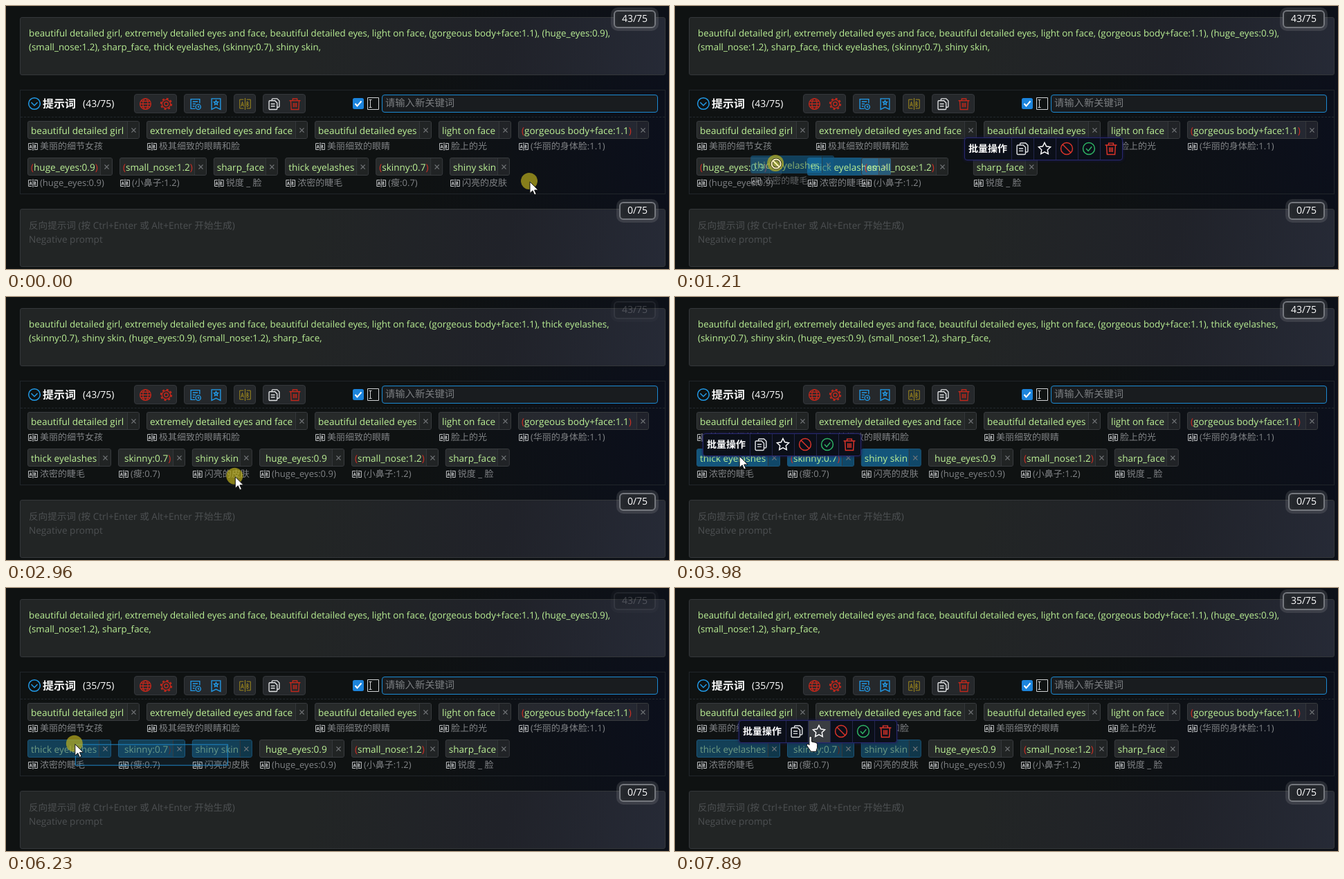
An HTML page that plays this animation: 958x380 px, repeating every 8000 ms.

```html
<!DOCTYPE html>
<html lang="zh">
<head>
<meta charset="utf-8">
<title>Prompt tags</title>
<style>
html, body { margin: 0; width: 100%; height: 100%; overflow: hidden; background: #0f1212; }
#stage { position: relative; width: 958px; height: 380px; overflow: hidden;
  background: radial-gradient(circle at 1000px 190px, #0b0f1d, #0f1212 420px);
  font: 13.55px/20px "Open Sans", "Noto Sans CJK SC", "Noto Sans CJK", sans-serif;
  color: #fff; text-rendering: geometricPrecision; }
#stage div { position: absolute; box-sizing: border-box; white-space: pre; }
svg { position: absolute; overflow: visible; fill: none; stroke: currentColor; stroke-width: 1.3; }
.area { border: 1px solid #34373a; border-radius: 3px; padding: 12px; font-size: 13.35px;
  background: linear-gradient(100deg, #222525 45%, #202229 75%, #262a36); }
.live { color: #b9ee94; }
#stage .hint { color: #4d5052; font-size: 13.6px; padding-top: 13px; }
.panel { border: 1px solid #20252a; }
.rule { border-top: 1px dashed #23292e; }
.box { border: 1px solid #34373b; border-radius: 4px; background: #25282b; }
.badge { border: 2px solid #74777d; border-radius: 6px; background: #23262b; text-align: center;
  line-height: 22px; font-size: 14px; box-shadow: 0 0 0 4px #c0c0c026, inset 0 0 8px #c0c0c013; }
.title { font-size: 16px; font-weight: 700; line-height: 24px; }
.input { border: 1px solid #1c8ad2; border-radius: 4px; background: #191c1f; color: #7c7f82;
  font-size: 14.3px; line-height: 24px; padding-left: 4px; }
.tag { height: 26px; border: 1px solid #383b3e; border-radius: 3px; background: #ffffff1a;
  color: #bdf296; padding-left: 4px; line-height: 26px; }
.tag i { color: #d02f24; font-style: normal; }
.close { right: 0; top: 0; width: 17px; height: 24px; background: #00000026; border-left: 1px solid #34373a; }
.close svg { left: 5px; top: 9px; color: #74777a; }
.picked { background: #1573aab0; border-color: #1b5478; }
.off { color: #6f8a60; }
.off i { color: #5d2822; }
.off.picked { background: #17608599; color: #6e9a83; }
.note { top: 26px; left: 0; height: 20px; font-size: 13px; color: #808386; padding-left: 18px; line-height: 21px; }
.note svg { left: 1px; top: 5px; }
.menu { width: 229px; height: 33px; border: 1px solid #28286f; border-radius: 4px; background: #0b0f19;
  box-shadow: 0 0 4px #191950; font-size: 14px; font-weight: 700; line-height: 32px; padding-left: 5px; }
.cell { top: 0; width: 32px; height: 31px; border-left: 1px solid #23264a; }
.cell svg { left: 6px; top: 6px; }
.rect { border: 1px solid #1f86c4; background: #1f86c414; }
.spot { width: 24px; height: 24px; margin: -13px 0 0 -13px; border-radius: 50%; background: #c6b81ea8; }
</style>
</head>
<body>
<div id="stage"></div>
<script>
const stage = document.getElementById('stage');

function add(cls, x, y, w, h, html = '', parent = stage) {
  const e = document.createElement('div');
  e.className = cls;
  e.style.cssText = `left:${x}px;top:${y}px;` + (w ? `width:${w}px;` : '') + (h ? `height:${h}px;` : '');
  e.innerHTML = html;
  parent.append(e);
  return e;
}
const circle = (x, y, r, more = '') => `<circle cx="${x}" cy="${y}" r="${r}" ${more}/>`;
const path = (d, more = '') => `<path d="${d}" ${more}/>`;
const starPath = (cx, cy, r) => 'M' + Array.from({ length: 10 }, (_, i) => {
  const a = i * Math.PI / 5, q = i % 2 ? r * 0.5 : r;
  return (cx + q * Math.sin(a)).toFixed(2) + ' ' + (cy - q * Math.cos(a)).toFixed(2);
}).join('L') + 'Z';

const shapes = {
  fold: circle(8, 8, 7.4) + path('M4 6.5l4 4 4-4'),
  globe: circle(8, 8, 7.4) + '<ellipse cx="8" cy="8" rx="3.4" ry="7.4"/>' + path('M.6 8h14.8M2 4.2h12M2 11.8h12'),
  gear: circle(8, 8, 2.6) + circle(8, 8, 5.8) + circle(8, 8, 7.2, 'stroke-width="2" stroke-dasharray="2.8 2.85"'),
  list: path('M14 7V1.500H2v13h6M4.500 5h7M4.500 8h4M4.500 11h2.500') + circle(12, 12, 3.4) + path('M12 10.300v2h1.500'),
  mark: path('M2 .8h12v14.700l-6-3-6 3z') + path(starPath(8, 6.4, 3)),
  ab: path('M6 2H.7v12H6M10 2h5.300v12H10M8 0v16M2.500 11.500l1.800-6.500 1.800 6.500M3.200 9.500h2.200M10.300 5v6.500h1.500q1.800-1.600 0-3.200h-1.500 1.300q1.600-1.600 0-3.300z', 'stroke-width="1" vector-effect="non-scaling-stroke"'),
  copy: path('M5 3.500V2q0-1.200 1.200-1.200H12l3 3v7.500q0 1.200-1.200 1.200H12M2.200 3.500H9l3 3v7.800q0 1.200-1.200 1.200H2.200Q1 15.500 1 14.300V4.700q0-1.200 1.200-1.200zM3.500 8h5.500M3.500 11h5.500'),
  bin: path('M.5 3.500h15M5 3.500V1h6v2.500M2.300 3.500l.7 12h10l.7-12M6 6.500v6M8 6.500v6M10 6.500v6'),
  star: path(starPath(8, 8.4, 8)),
  ban: circle(8, 8, 7.5) + path('M2.700 2.700l10.600 10.600'),
  ok: circle(8, 8, 7.5) + path('M4.500 8l2.700 3 4.600-5.500'),
  cross: path('M1 1l14 14M15 1L1 15', 'stroke-width="2.800"')
};
const icon = (name, color, w = 16, h = w) =>
  `<svg width="${w}" height="${h}" viewBox="0 0 16 16" preserveAspectRatio="none"${color ? ` style="color:${color}"` : ''}>${shapes[name]}</svg>`;
const close = `<div class="close">${icon('cross', '', 7)}</div>`;

// fixed parts
const prompt = add('area live', 20, 16, 933, 84);
add('panel', 20, 121, 933, 151);
add('rule', 21, 160, 931, 1);
add('area hint', 20, 293, 933, 84, '反向提示词 (按 Ctrl+Enter 或 Alt+Enter 开始生成)\nNegative prompt');
const badge = add('badge', 878, 6, 61, 26);
add('badge', 886, 283, 53, 26, '0/75');

const red = '#c0281c', bright = '#dc342a', blue = '#2299e6', white = '#dfe1e3';
add('', 32, 132, 18, 18, icon('fold', blue, 18));
add('title', 53, 129, 0, 24, '提示词');
const count = add('', 111, 132, 0, 20);
count.style.fontSize = '14px';
[[185, 62], [257, 62], [329, 32], [371, 62]].forEach(([x, w]) => add('box', x, 127, w, 28));
[['globe', 201, red], ['gear', 231, red], ['list', 273, blue], ['mark', 303, blue],
 ['ab', 345, '#a08a1c'], ['copy', 387, white], ['bin', 417, red]]
  .forEach(([n, x, c]) => add('', x - 8.5, 132.5, 17, 17, icon(n, c, 17)));
add('', 501, 133, 16, 16, `<svg width="16" height="16"><rect width="16" height="16" rx="2.500" fill="#1c84dc" stroke="none"/>${path('M3.500 8l3 3.500 6-7', 'stroke="#fff" stroke-width="2"')}</svg>`);
add('', 522, 132, 17, 18, `<svg width="17" height="18">${path('M.5.5h16v17H.5zM2.500 3.500h4M2.500 14.500h4M4.500 3.500v11', 'stroke="#cfd1d3" stroke-width="1"')}</svg>`);
add('input', 543, 128, 399, 26, '请输入新关键词');

// tags
function makeTag(x, y, w, text, note) {
  const wrap = add('', x, y, w, 46);
  const html = text.replace(/^\(|\)$/g, '<i>$&</i>');
  const box = add('tag', 0, 0, w, 26, html + close, wrap);
  add('note', 0, 26, 0, 20, icon('ab', '#c4c6c8', 14, 12) + note, wrap);
  return { wrap, box, w, parens: box.querySelectorAll('i') };
}
[[31, 162, 'beautiful detailed girl', '美丽的细节女孩'],
 [203, 233, 'extremely detailed eyes and face', '极其细致的眼睛和脸'],
 [446, 169, 'beautiful detailed eyes', '美丽细致的眼睛'],
 [625, 105, 'light on face', '脸上的光'],
 [740, 189, '(gorgeous body+face:1.1)', '(华丽的身体脸:1.1)']]
  .forEach(([x, w, s, n]) => makeTag(x, 166, w, s, n));

const tags = {};
[['thick', 121, 'thick eyelashes', '浓密的睫毛'], ['huge', 123, '(huge_eyes:0.9)', '(huge_eyes:0.9)'],
 ['small', 125.8, '(small_nose:1.2)', '(小鼻子:1.2)'], ['sharp', 93.4, 'sharp_face', '锐度 _ 脸'],
 ['skinny', 96.8, '(skinny:0.7)', '(瘦:0.7)'], ['shiny', 87.2, 'shiny skin', '闪亮的皮肤']]
  .forEach(([k, w, s, n]) => tags[k] = makeTag(0, 219, w, s, n));
const group = ['thick', 'skinny', 'shiny'];
const ghost = makeTag(0, 0, 121, 'thick eyelashes', '浓密的睫毛');
ghost.box.classList.add('picked');
ghost.wrap.style.opacity = 0.7;

const orders = [
  [0, 'huge small sharp thick skinny shiny'],
  [1000, 'huge small thick sharp'],
  [1130, 'huge thick small sharp'],
  [1270, 'thick huge small sharp'],
  [1690, 'thick skinny shiny huge small sharp']
].map(([at, list]) => {
  const spots = {};
  let x = 31;
  for (const k of list.split(' ')) { spots[k] = x; x += tags[k].w + 10; }
  return { at, spots };
});
const finalSpots = orders[orders.length - 1].spots;

// overlays
const rect = add('rect', 0, 0);
const menu = add('menu', 0, 0, 0, 0, '批量操作');
const cells = [['copy', white], ['star', '#fff'], ['ban', bright], ['ok', '#2fb565'], ['bin', bright]]
  .map(([n, c], i) => add('cell', 67 + i * 32, 0, 32, 31, icon(n, c, 18), menu));
const spot = add('spot', 0, 0);
const pointer = (d, dx, dy) =>
  add('', 0, 0, 1, 1, `<svg width="20" height="24" style="left:${dx}px;top:${dy}px">${path(d, 'fill="#fff" stroke="#111" stroke-width="1"')}</svg>`);
const arrow = pointer('M0 0V16.500l4-3.700 2.600 6 2.600-1.100-2.600-5.700h5.400z', 0, 0);
const hand = pointer('M4.500 2a1.800 1.800 0 0 1 3.600 0v6l5.500 1.200q2.600.6 2.600 3v4l-1.600 6H7L1 13.500q-.5-2.500 2-2l1.500 1.500z', -6, 0);
const denied = add('', 0, 0, 1, 1, `<svg width="16" height="16" style="left:-8px;top:-8px">${circle(8, 8, 6.5, 'stroke="#222" stroke-width="3.500"')}<g stroke="#fff4b8" stroke-width="2">${circle(8, 8, 6.5)}${path('M3.500 3.500l9 9')}</g></svg>`);

// timing
const LOOP = 8000, STEP = 67.4, DROP = 1690, MUTE = 4700;
const route = [
  [70, 757, 254], [140, 735, 250], [270, 590, 236], [410, 440, 225], [480, 420, 223], [680, 420, 223],
  [820, 440, 231], [890, 440, 231], [1210, 147, 228], [1480, 75, 228], [1690, 75, 228], [1900, 150, 245],
  [2200, 290, 263], [2430, 332, 265], [2630, 332, 265], [2760, 333, 260], [2960, 333, 260], [3100, 290, 256],
  [3300, 110, 238], [3430, 42, 231], [3770, 42, 231], [3980, 94, 230], [4320, 186, 214], [4650, 186, 214],
  [4850, 215, 250], [5100, 290, 280], [5340, 321, 257], [5540, 321, 257], [5850, 220, 245], [6100, 120, 228],
  [6230, 94, 225], [6990, 94, 225], [7400, 175, 222], [7600, 245, 216], [7750, 242, 216], [7890, 194, 214]
];
const presses = [[0, 680], [890, DROP], [2830, 3770], [4640, 4720], [5540, 6570]];
const drags = [[0, 680], [2830, 3770], [5540, 6570]];
const menus = [[680, DROP, 418, 190], [3770, MUTE, 40, 197], [6570, LOOP, 92, 191]];
const fades = [[2760, 3490], [5820, 6490]];

const clamp = v => Math.max(0, Math.min(1, v));
const ease = v => 1 - (1 - clamp(v)) ** 2;
const during = (list, t) => list.find(([a, b]) => t >= a && t < b);
const show = (e, on) => e.style.display = on ? '' : 'none';
const move = (e, x, y) => e.style.transform = `translate(${x}px,${y}px)`;

function along(t) {
  const i = route.findIndex(p => p[0] > t);
  if (i === 0) return route[0].slice(1);
  if (i < 0) return route[route.length - 1].slice(1);
  const [a, x, y] = route[i - 1], [b, u, v] = route[i], f = (t - a) / (b - a);
  return [x + (u - x) * f, y + (v - y) * f];
}
function slot(k, t) {
  let x = orders[0].spots[k];
  for (const { at, spots } of orders.slice(1)) {
    if (t < at) break;
    x += ((spots[k] ?? finalSpots[k]) - x) * ease((t - at) / 150);
  }
  return x;
}
function wording(t) {
  const head = 'beautiful detailed girl, extremely detailed eyes and face, beautiful detailed eyes, light on face, (gorgeous body+face:1.1), ';
  const old = '(huge_eyes:0.9),\n(small_nose:1.2), sharp_face,';
  if (t >= MUTE) return head + old;
  if (t >= DROP + 60) return head + 'thick eyelashes,\n(skinny:0.7), shiny skin, (huge_eyes:0.9), (small_nose:1.2), sharp_face,';
  return head + old + ' thick eyelashes, (skinny:0.7), shiny skin,';
}

function draw(t) {
  const [cx, cy] = along(t);
  const drag = during(drags, t), open = during(menus, t);
  const carrying = t >= 890 && t < DROP;

  prompt.textContent = wording(t);
  count.textContent = t < MUTE ? '(43/75)' : '(35/75)';
  badge.textContent = t < 6490 ? '43/75' : '35/75';
  badge.style.opacity = fades.reduce((o, [a, b]) =>
    Math.min(o, 1 - 0.8 * clamp((t - a) / 140) * (1 - clamp((t - b + 67) / 140))), 1);

  show(rect, drag);
  if (drag) {
    const [sx, sy] = along(drag[0]);
    move(rect, cx, cy);
    rect.style.width = Math.max(0, sx - cx) + 'px';
    rect.style.height = Math.max(0, sy - cy) + 'px';
  }
  for (const k in tags) {
    const { wrap, box, w, parens } = tags[k], x = slot(k, t), mine = group.includes(k);
    move(wrap, x, 0);
    show(wrap, !(carrying && mine && k !== 'thick'));
    box.classList.toggle('picked', Boolean(mine && (open || drag && cx < x + w && cy < 245)));
    box.classList.toggle('off', mine && t >= MUTE);
    if (k === 'huge') parens.forEach(p => p.style.opacity = t < DROP ? 1 : 0);
    if (k === 'skinny') parens[0].style.opacity = t > DROP && t < 3430 || t > 6000 ? 0 : 1;
  }
  show(ghost.wrap, carrying);
  move(ghost.wrap, cx - 37, cy - 12);

  show(menu, open);
  let over = -1;
  if (open) {
    const [, , mx, my] = open;
    move(menu, mx, my);
    if (cy >= my && cy < my + 32) over = Math.floor((cx - mx - 68) / 32);
    if (carrying || !cells[over]) over = -1;
    cells.forEach((c, i) => c.style.background = i === over ? '#3a3d42' : '');
  }
  show(spot, during(presses, t));
  show(denied, carrying);
  show(hand, over >= 0);
  show(arrow, !carrying && over < 0);
  [spot, denied, hand, arrow].forEach(e => move(e, cx, cy));
}

const start = performance.now();
function tick() {
  const t = (performance.now() - start) % LOOP;
  draw(Math.floor((t + 8) / STEP) * STEP);
  requestAnimationFrame(tick);
}
tick();
</script>
</body>
</html>
```
